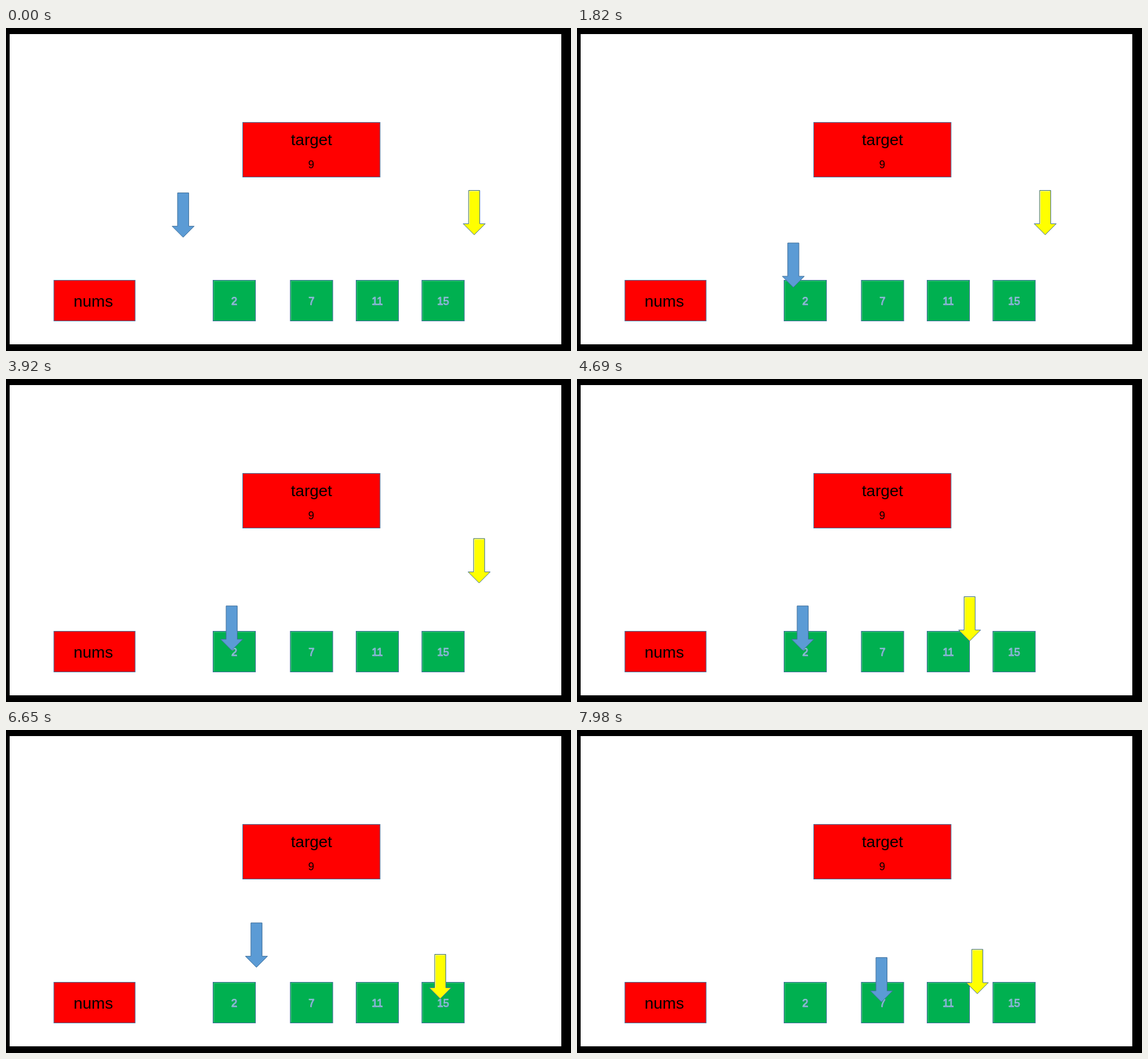
An HTML page that plays this animation: 932 by 532 pixels, repeating every 8000 ms.

```html
<!DOCTYPE html>
<html lang="en">
<head>
<meta charset="utf-8">
<title>Two pointers</title>
<style>
  html, body { margin: 0; width: 100%; height: 100%; overflow: hidden; background: #000; }
  svg { display: block; width: 100vw; height: 100vh; }
  text { font-family: "Liberation Sans", Arial, sans-serif; font-size: 17.7px; text-anchor: middle; }
  .big { font-size: 26.6px; }
  .box, .arrow { stroke: #41719c; stroke-width: 1; }
  .red { fill: #f00; }
  .green { fill: #00b050; }
  .bevel { fill: none; stroke: #fff; stroke-opacity: .22; stroke-width: 1; }
  .digit { fill: #5b9bd5; stroke: #c3dce4; stroke-width: .6; }
  .shade { fill: #3f7f93; }
</style>
</head>
<body>
<svg viewBox="0 0 932 532">
  <defs>
    <path id="arrow" d="M-9.2 -73.2H9.2V-18.3H18.2L0 0L-18.2 -18.3H-9.2Z"/>
    <g id="cell">
      <rect class="box green" x=".5" y="415.5" width="70" height="67"/>
      <path class="bevel" d="M2 481V417H69"/>
    </g>
  </defs>
  <rect x="6" y="10" width="910" height="511" fill="#fff"/>
  <rect class="box red" x="390.5" y="155.5" width="226.5" height="90"/>
  <text class="big" x="504" y="192.5">target</text>
  <text x="503.5" y="230.5">9</text>
  <rect class="box red" x="79" y="415.5" width="134" height="67"/>
  <text class="big" x="144" y="459">nums</text>
  <g id="cells"></g>
  <use id="blue" class="arrow" href="#arrow" fill="#5b9bd5"/>
  <g id="yellow">
    <use class="arrow" href="#arrow" fill="#ff0"/>
    <path class="bevel" style="stroke-opacity:.6" d="M-7.7 -18V-71.7H7.5"/>
  </g>
</svg>
<script>
  const LOOP = 8000, TICK = 70, SPAN = 1060;

  const cells = [[341, 2], [468.5, 7], [577, 11], [685.5, 15]];
  document.getElementById('cells').innerHTML = cells.map(([x, n]) => `
    <use href="#cell" x="${x}"/>
    <text class="shade" x="${x + 36.3}" y="457.1">${n}</text>
    <text class="digit" x="${x + 35.5}" y="456.3">${n}</text>`).join('');

  // Each move takes the arrow tip along a straight line; a new move may begin with a jump.
  const move = (start, from, to, span = SPAN) => ({ start, from, to, span });
  const tracks = {
    blue: [
      move(-136, [291.7, 344.1], [372.3, 447], 2750),
      move(6063, [288, 310.8], [502.3, 448])
    ],
    yellow: [
      move(0, [772.3, 340.7], [772.3, 340.7]),
      move(2852, [785, 340], [507, 446]),
      move(3908, [780.5, 336], [622.3, 450]),
      move(4985, [773, 327], [716.3, 442.7]),
      move(7215, [790, 333.3], [632, 456.5])
    ]
  };

  const ease = u => (1 - Math.cos(Math.PI * u)) / 2;

  function tipAt(track, time) {
    const { start, from, to, span } = track.filter(m => m.start <= time).pop();
    const p = ease(Math.min(1, (time - start) / span));
    return from.map((v, i) => v + (to[i] - v) * p);
  }

  const origin = performance.now();

  function draw(now) {
    const elapsed = Math.max(0, now - origin) % LOOP;
    const time = Math.floor(elapsed / TICK) * TICK;
    for (const id in tracks) {
      const [x, y] = tipAt(tracks[id], time);
      document.getElementById(id).setAttribute('transform', `translate(${x.toFixed(2)} ${y.toFixed(2)})`);
    }
    requestAnimationFrame(draw);
  }
  draw(origin);
</script>
</body>
</html>
```
